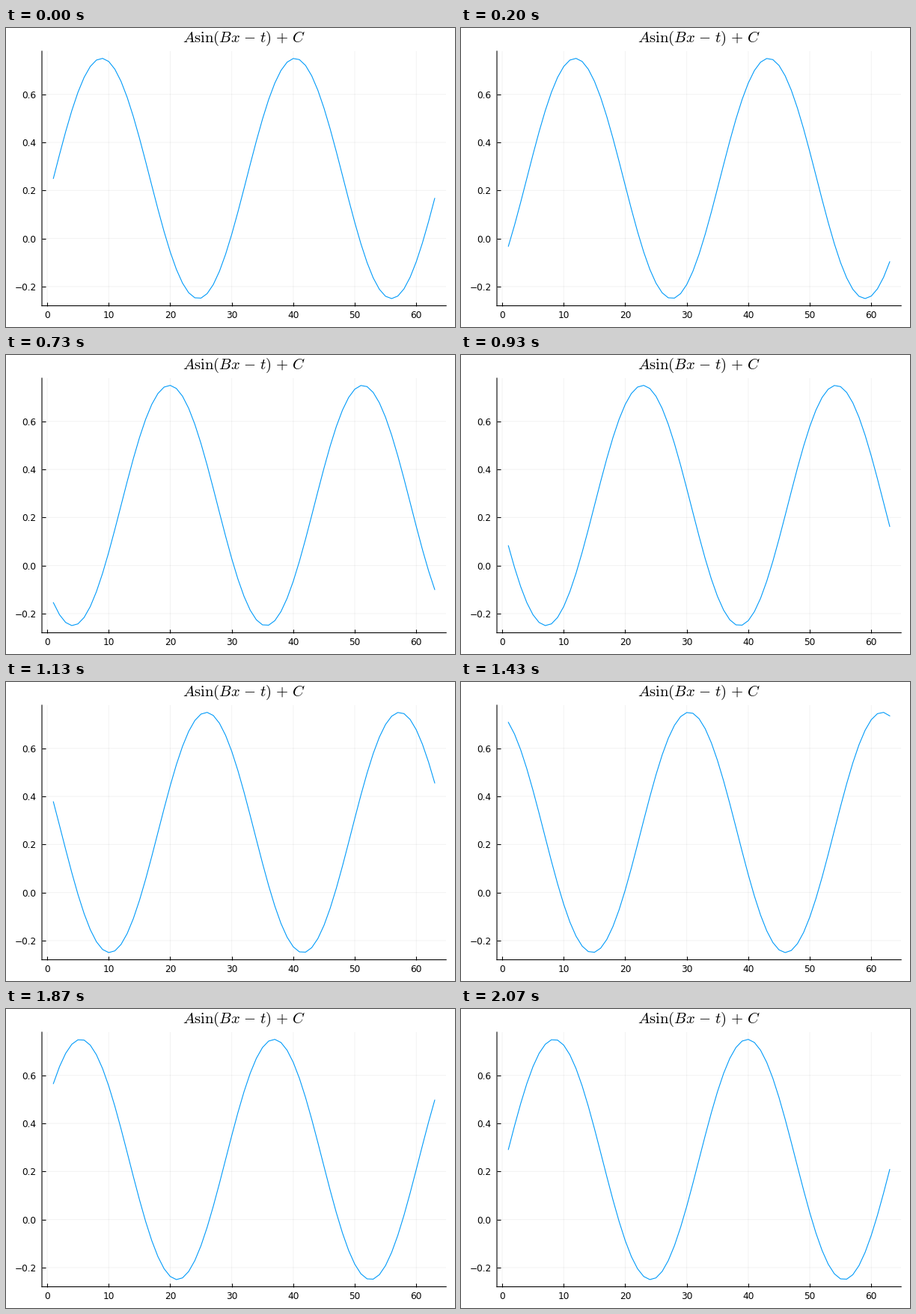
Write a matplotlib script that moves like this. It is 600 by 400 pixels and loops after 2110 ms.

```python
import matplotlib.pyplot as plt
import numpy as np
from matplotlib.animation import FuncAnimation

W, H, DPI = 600, 400, 100
PX = 72 / DPI                      # one pixel in points
LEFT, RIGHT, TOP, BOTTOM = 48, 588.2, 31, 371.6
A, B, C = 0.5, 1, 0.25
STEPS = 63                         # phase steps of 0.1 per loop
TICK_MS, LOOP_MS = 10, 2110

plt.rcParams.update({
    "font.family": "DejaVu Sans",
    "mathtext.fontset": "cm",
    "axes.unicode_minus": True,
})

x = 0.2 * np.arange(63)
index = np.arange(1, 64)


def wave(t):
    return A * np.sin(B * x - t) + C


def padded(values, share=0.03):
    lo, hi = np.min(values), np.max(values)
    pad = share * (hi - lo)
    return lo - pad, hi + pad


def spaced(op):
    return rf"\hspace{{0.12}}{op}\hspace{{0.12}}"


fig = plt.figure(figsize=(W / DPI, H / DPI), dpi=DPI, facecolor="white")
ax = fig.add_axes([LEFT / W, 1 - BOTTOM / H, (RIGHT - LEFT) / W, (BOTTOM - TOP) / H])
ax.set_xlim(padded(index))
ax.set_xticks(range(0, 61, 10))
ax.set_yticks([-0.2, 0, 0.2, 0.4, 0.6])
ax.yaxis.set_major_formatter("{x:.1f}")
ax.set_axisbelow(True)
ax.grid(color="black", alpha=0.05, lw=PX, snap=False)
ax.spines[["top", "right"]].set_visible(False)
for side in ("left", "bottom"):
    ax.spines[side].set(linewidth=1.1 * PX, snap=False)
ax.tick_params(direction="in", length=5 * PX, width=1.1 * PX, labelsize=8.7)
ax.tick_params(axis="x", pad=6.5 * PX)
ax.tick_params(axis="y", pad=7.3 * PX)
for mark in ax.get_xticklines() + ax.get_yticklines():
    mark.set_snap(False)

title = r"$A\mathrm{sin}(Bx" + spaced("-") + "t)" + spaced("+") + "C$"
fig.text((LEFT + RIGHT) / 2 / W, 1 - 19 / H, title,
         size=14.8, ha="center", va="baseline")
line, = ax.plot(index, wave(0), color="#009AF9", lw=1.1 * PX)


def update(n):
    # steps last 100/3 ms, rounded to whole ticks
    step = min((6 * n + 3) // 20, STEPS - 1)
    y = wave(0.1 * step)
    line.set_ydata(y)
    ax.set_ylim(padded(y))
    return line,


anim = FuncAnimation(fig, update, frames=LOOP_MS // TICK_MS, interval=TICK_MS,
                     repeat=True, repeat_delay=0, blit=False)
plt.show()
```
